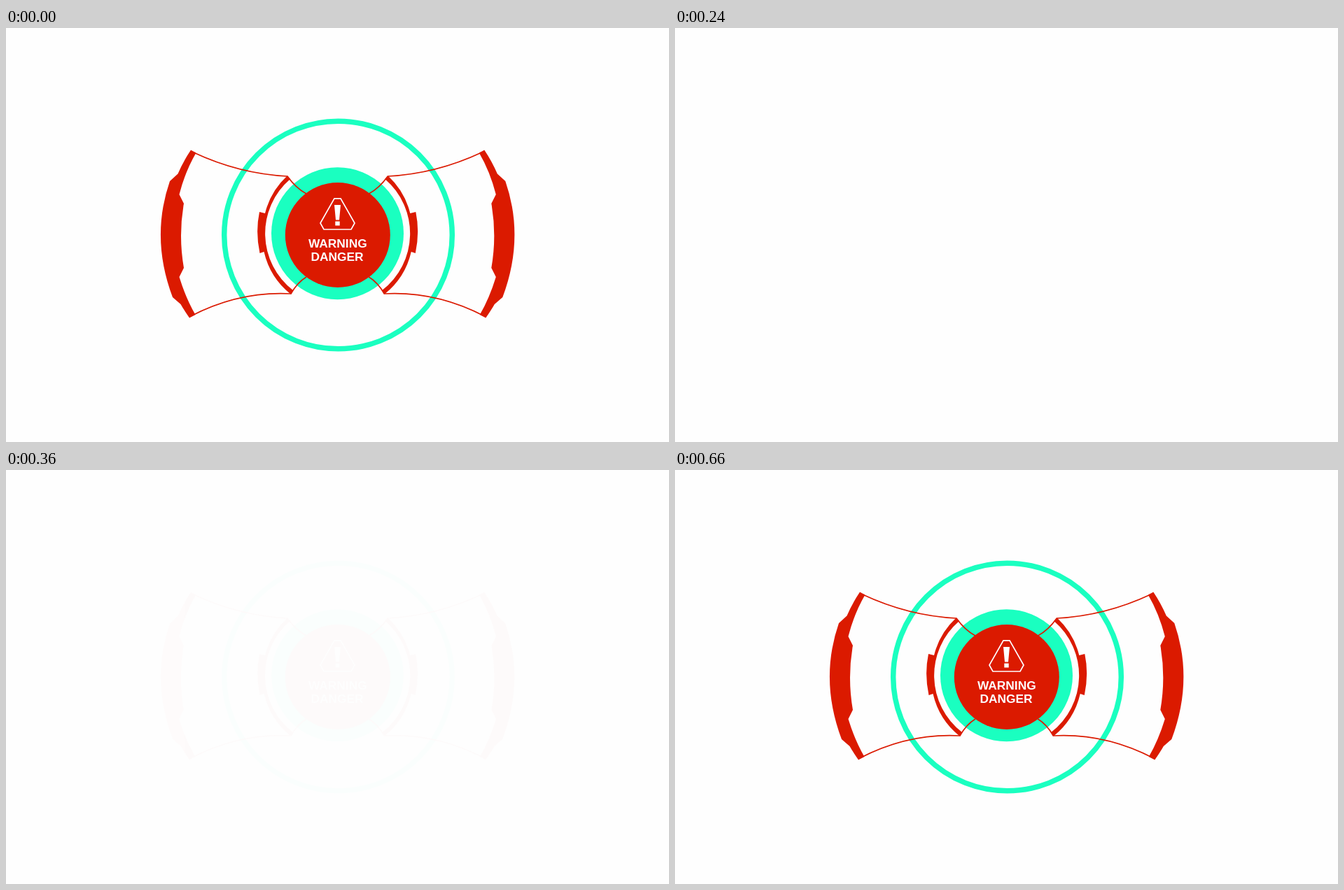
An HTML page that plays this animation: 947 by 592 pixels, repeating every 800 ms.

```html
<!DOCTYPE html>
<html lang="en">
<head>
<meta charset="utf-8">
<title>Warning</title>
<style>
html, body { margin: 0; width: 100%; height: 100%; overflow: hidden; background: #fefefe; }
svg { display: block; width: 947px; height: 592px; }
text { font: bold 17.35px "Liberation Sans", Arial, sans-serif; text-anchor: middle; fill: #fefefe; }
</style>
</head>
<body>
<svg viewBox="0 0 947 592">
  <g id="sign" fill="#db1a00">
    <circle cx="474.5" cy="296" r="162.8" fill="none" stroke="#1affc0" stroke-width="7.5"/>
    <circle cx="473.5" cy="293.7" r="94.5" fill="#1affc0"/>
    <circle cx="473.8" cy="296" r="75"/>
    <g id="wing">
      <path d="M264 174.5 L271.5 178.5 Q256 205 247.5 238 L254 251 Q246 297 254 343 L247.5 356
               Q257 387 270.5 410 L262 414.5 Q254 403 249.5 395 L238 385 Q206 300 234 219 L245.5 208.5 Q253 191 264 174.5Z"/>
      <path d="M401.5 211.5 A109 109 0 0 0 370 265 L362 263 Q356 292 362.5 322 L368.5 320
               A109 109 0 0 0 406.5 380.5 L410 375 A102.5 102.5 0 0 1 406 216Z"/>
      <path d="M268 178 Q333 208.5 402 212 Q414 229 429 237 M264 412 Q333 376 407 380 Q416 364 429 356"
            fill="none" stroke="#db1a00" stroke-width="1.7"/>
    </g>
    <use href="#wing" transform="matrix(-1 0 0 1 947.3 0)"/>
    <path d="M469 243.8 H478 L498 279 L493 288 H454 L449 279Z" fill="none" stroke="#fefefe" stroke-width="1.7"/>
    <path d="M469 253 H478 L476 274.5 H471Z M470.3 276.5 H476.7 V282.5 H470.3Z" fill="#fefefe"/>
    <text x="473.8" y="314.3">WARNING</text>
    <text x="473" y="333.3">DANGER</text>
  </g>
</svg>
<script>
const sign = document.getElementById("sign");
// [start ms, opacity]
const steps = [[0, 1], [200, 0.5], [240, 0], [280, 0.004], [360, 0.012], [440, 1]];
const start = performance.now();

function draw(now) {
  const t = Math.max(0, now - start) % 800;
  sign.setAttribute("opacity", steps.findLast(s => s[0] <= t)[1]);
  requestAnimationFrame(draw);
}
draw(start);
</script>
</body>
</html>
```
